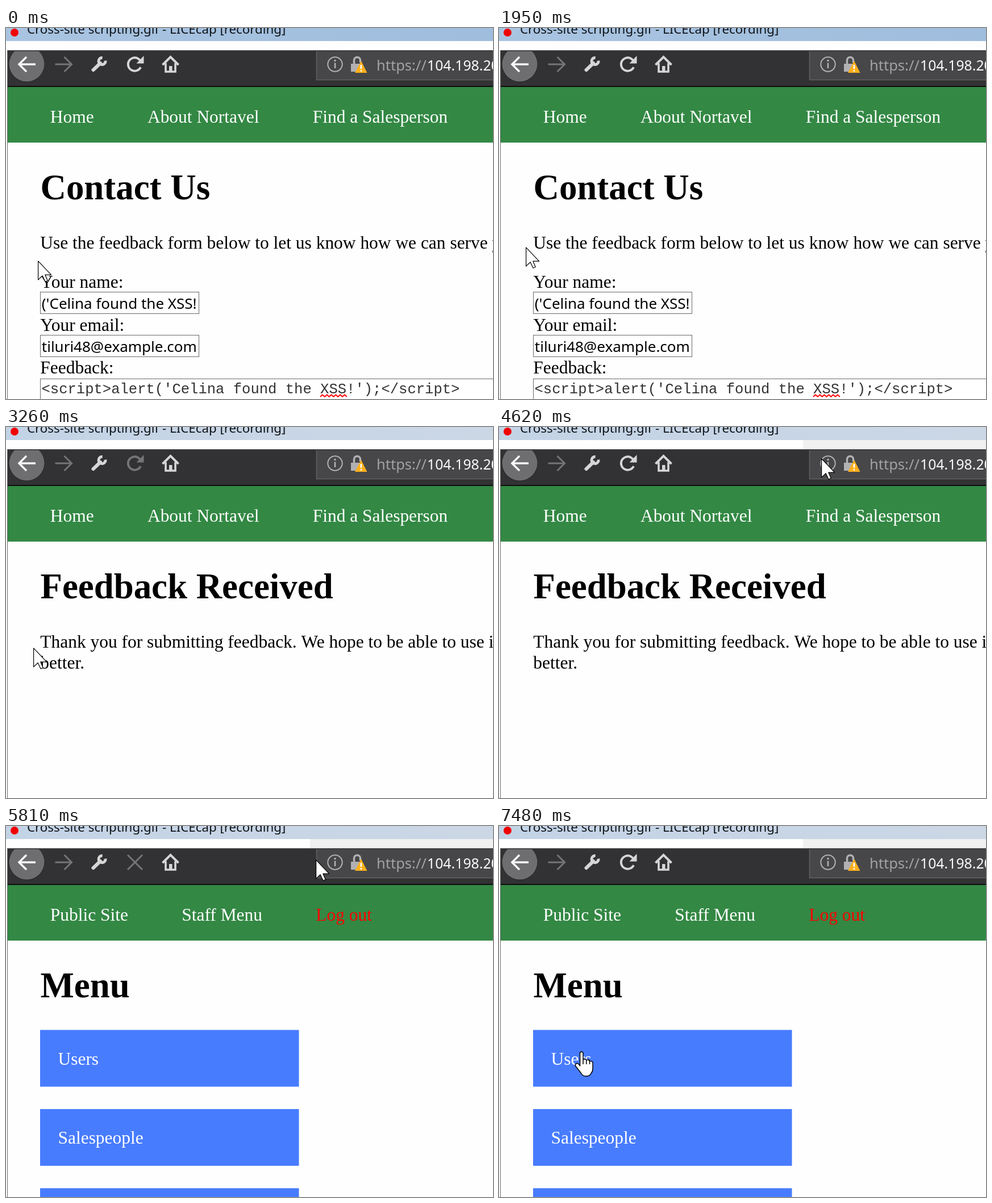
Animation, 857 px wide and 654 px high, one loop 8000 ms. Source, as an HTML page with a canvas:

```html
<!DOCTYPE html>
<html lang="en">
<head>
<meta charset="utf-8">
<title>Feedback form</title>
<style>
html, body { margin: 0; width: 100%; height: 100%; overflow: hidden; background: #fefefe; }
canvas { display: block; }
</style>
</head>
<body>
<canvas id="stage" width="857" height="654"></canvas>
<script>
const W = 857, H = 654, LOOP = 8000;
const ctx = document.getElementById('stage').getContext('2d');
const SERIF = '"Liberation Serif", serif';
const SANS = '"Noto Sans", sans-serif';
const MONO = '"Liberation Mono", monospace';
const EM = 31.44;
const LIGHT = '#d6d6d7', DIM = '#757577', GREY = '#b1b1b3', EDGE = '#6a6a6a';
const TAU = Math.PI * 2;

const TICK = 150, RELOAD_PAUSE = 600;
const loads = [
  { start: 2810, done: 3260, page: thanksPage },
  { start: 5660, done: 5960, page: menuPage }
];
const BLUR_AT = 2680, STRIP_AT = 4460;

// Pointer strokes, each going on from where the one before ended.
const HOME = { x: 56, y: 410 };
const strokes = [
  { first: 150, last: 1060, x: 47, y: 392 },
  { first: 1520, last: 1950, x: 47, y: 386 },
  { first: 2250, last: 2400, x: 47, y: 384 },
  { first: 2680, last: 3260, x: 48, y: 389 },
  { first: 3860, last: 4160, x: 768, y: -43 },
  { first: 4460, last: 4770, x: 532, y: 72 },
  { first: 4920, last: 5220, x: 545, y: 59 },
  { first: 5960, last: 7030, x: 145, y: 397 },
  { first: 7330, last: 7480, x: 145, y: 398 }
];

function ease(p) {
  return p < 0.5 ? 4 * p ** 3 : 1 - 4 * (1 - p) ** 3;
}

function pointerAt(t) {
  let from = HOME;
  for (const to of strokes) {
    if (t < to.first) break;
    const gaps = Math.round((to.last - to.first) / TICK);
    const gone = Math.min(1, (t - to.first) / (to.last - to.first));
    const step = Math.floor(gone * gaps + 0.07) + 1;
    const p = ease(step / (gaps + 1));
    from = { x: from.x + (to.x - from.x) * p, y: from.y + (to.y - from.y) * p };
  }
  return { x: Math.round(from.x), y: Math.round(from.y) };
}

function pageAt(t) {
  return loads.reduce((page, l) => t >= l.done - TICK ? l.page : page, contactPage);
}

function reloadAt(t) {
  for (const { start, done } of loads) {
    if (t >= start && t < done) return 'stop';
    if (t >= done && t < done + RELOAD_PAUSE) return 'off';
  }
  return 'on';
}

function rect(x, y, w, h, fill) {
  ctx.fillStyle = fill;
  ctx.fillRect(x, y, w, h);
}

function text(str, x, y, size, color = '#000', family = SERIF, weight = '') {
  ctx.font = `${weight} ${size}px ${family}`;
  ctx.fillStyle = color;
  ctx.fillText(str, x, y);
}

function trace(points, close) {
  ctx.beginPath();
  points.forEach(([x, y]) => ctx.lineTo(x, y));
  if (close) ctx.closePath();
}

function line(points, color, width) {
  trace(points);
  ctx.strokeStyle = color;
  ctx.lineWidth = width;
  ctx.stroke();
}

function poly(points, fill) {
  trace(points, true);
  ctx.fillStyle = fill;
  ctx.fill();
}

function arc(x, y, r, from, to, color, width) {
  ctx.beginPath();
  ctx.arc(x, y, r, from, to);
  ctx.strokeStyle = color;
  ctx.lineWidth = width;
  ctx.stroke();
}

function disc(x, y, r, fill) {
  ctx.beginPath();
  ctx.arc(x, y, r, 0, TAU);
  ctx.fillStyle = fill;
  ctx.fill();
}

function clipped(x, y, w, h, paint) {
  ctx.save();
  ctx.beginPath();
  ctx.rect(x, y, w, h);
  ctx.clip();
  paint();
  ctx.restore();
}

function titleBar(t) {
  const [left, right] = t < BLUR_AT ? ['#a9c4e1', '#9fbddd'] : ['#c3d3e6', '#cbd7e5'];
  const g = ctx.createLinearGradient(0, 0, W, 0);
  g.addColorStop(0, left);
  g.addColorStop(1, right);
  rect(0, 0, W, 23, g);
  if (t >= STRIP_AT) rect(535, 23, W, 16, '#f0f0f0');
  disc(15, 8, 7, '#f00000');
  text('Cross-site scripting.gif - LICEcap [recording]', 37, 10, 22.3, '#101418', SANS);
}

// Horizontal arrow centred on (x, 64); dir is -1 for left, 1 for right.
function navArrow(x, dir, color, width) {
  const tip = x + dir * 14;
  line([[x - dir * 15, 64], [tip, 64]], color, width);
  line([[tip - dir * 13, 51], [tip, 64], [tip - dir * 13, 77]], color, width);
}

function reloadIcon(state) {
  if (state === 'stop') {
    line([[214, 51], [240, 77]], DIM, 3);
    line([[240, 51], [214, 77]], DIM, 3);
    return;
  }
  const color = state === 'on' ? LIGHT : DIM;
  arc(226.5, 64, 11.7, 0.45, TAU - 0.6, color, 3.8);
  poly([[242.5, 49], [242.5, 62.5], [229.5, 62.5]], color);
}

function wrenchIcon() {
  ctx.lineCap = 'round';
  line([[153.5, 74], [166, 62]], LIGHT, 6);
  ctx.lineCap = 'butt';
  arc(169, 58.5, 6, -0.15, TAU * 0.75 + 0.1, LIGHT, 5);
}

function homeIcon() {
  line([[275.5, 65], [289.5, 51], [303.5, 65]], LIGHT, 4);
  line([[281, 62], [281, 77], [298, 77], [298, 62]], LIGHT, 3.6);
  rect(287, 67, 5.5, 10, LIGHT);
}

function addressBar() {
  rect(546, 41, W, 51, '#474749');
  line([[546.5, 41], [546.5, 91.5], [W, 91.5]], '#606062', 1.5);

  arc(579, 64, 12.7, 0, TAU, GREY, 2);
  disc(579, 57.5, 1.8, GREY);
  rect(577.7, 61.5, 2.6, 9.5, GREY);

  line([[612.5, 64], [612.5, 57]], GREY, 3.5);
  arc(618, 57, 5.5, Math.PI, TAU, GREY, 3.5);
  line([[623.5, 57], [623.5, 61]], GREY, 3.5);
  rect(607, 63, 19, 14, GREY);
  poly([[625, 58], [635.5, 79], [614, 79]], '#ffb01c');
  rect(623.6, 65, 2.6, 7, '#fff');
  rect(623.6, 74, 2.6, 2.6, '#fff');

  text('https://', 652, 75, 25.5, '#a2a2a4', SANS);
  text('104.198.20', 741, 75, 24.8, '#f9f9fa', SANS);
}

function toolbar(t) {
  rect(2, 39, W, 63, '#323234');
  clipped(3, 41, W, 61, () => {
    disc(36.5, 64, 31.5, '#1f1f21');
    disc(36.5, 63.5, 31, '#6e6e70');
    navArrow(37, -1, '#f9f9fa', 3.5);
    navArrow(101.5, 1, DIM, 3);
    wrenchIcon();
    reloadIcon(reloadAt(t));
    homeIcon();
    addressBar();
  });
  rect(2, 102, W, 2, '#0d0d0e');
}

function nav(labels, lastColor = '#fff') {
  rect(3, 104, W, 98, '#338844');
  let x = 77.8;
  labels.forEach((label, i) => {
    text(label, x, 167, EM, i === labels.length - 1 ? lastColor : '#fff');
    x += ctx.measureText(label).width + EM * 3;
  });
}

function publicNav() {
  nav(['Home', 'About Nortavel', 'Find a Salesperson']);
}

function heading(str) {
  text(str, 60.5, 302, EM * 2, '#000', SERIF, 'bold');
}

function body(str, y) {
  text(str, 60.3, y, EM);
}

function box(y, w, h) {
  rect(60, y, w, h, EDGE);
  rect(61, y + 1, w - 2, h - 2, '#fff');
}

function field(y, value) {
  box(y, 280, 39);
  clipped(62, y, 276, 39, () => text(value, 62.8, y + 29.5, 26, '#000', SANS));
}

function contactPage() {
  publicNav();
  heading('Contact Us');
  body('Use the feedback form below to let us know how we can serve you', 389);
  body('Your name:', 458);
  field(465, "('Celina found the XSS!");
  body('Your email:', 533.5);
  field(541, 'tiluri48@example.com');
  body('Feedback:', 609);
  box(618, W, H);
  text("<script>alert('Celina found the XSS!');<\/script>", 62.5, 643.5, 25.55, '#333', MONO);
  const wave = [];
  for (let x = 553; x <= 600; x += 3.9) wave.push([x, wave.length % 2 ? 646.5 : 650]);
  line(wave, '#f00', 2);
}

function thanksPage() {
  publicNav();
  heading('Feedback Received');
  body('Thank you for submitting feedback. We hope to be able to use it to', 389);
  body('better.', 426);
}

function menuPage() {
  nav(['Public Site', 'Staff Menu', 'Log out'], '#f00');
  heading('Menu');
  ['Users', 'Salespeople', ''].forEach((label, i) => {
    const y = 359.5 + i * 139.5;
    rect(60, y, 455.5, 100, '#487cff');
    text(label, 91.5, y + 61, EM, '#fff');
  });
}

// Fills and outlines a pointer shape with its corner at (x, y).
function shape(path, x, y, width) {
  ctx.save();
  ctx.translate(x, y);
  ctx.lineJoin = 'round';
  ctx.lineWidth = width;
  ctx.fillStyle = '#fff';
  ctx.strokeStyle = '#000';
  ctx.fill(path);
  ctx.stroke(path);
  ctx.restore();
}

const arrowPath = new Path2D('M0 0V33L7.5 25.8L12.5 36.3L16.6 34.4L12.2 24.2H23Z');
const handPath = new Path2D(
  'M9.5 26V4Q9.5 1 12.2 1T15 4V15Q20 12.5 20.8 16Q25.5 13.5 26.5 18Q32 16.5 32 21V31' +
  'Q32 36 29 39Q27 44 20 44Q14 44 11 38Q7 33 1.5 26Q.5 23 3.5 21.5Q7 21 9.5 26Z');
for (const x of [15, 20.8, 26.5]) {
  handPath.moveTo(x, 15);
  handPath.lineTo(x, 23);
}

function pointer(t) {
  const { x, y } = pointerAt(t);
  const overButton = pageAt(t) === menuPage && y > 359;
  if (overButton) shape(handPath, x - 12, y - 1, 1.5);
  else shape(arrowPath, x + 0.6, y + 0.9, 1.2);
}

function draw(t) {
  rect(0, 0, W, H, '#fefefe');
  titleBar(t);
  toolbar(t);
  pageAt(t)();
  rect(2, 39, W, 1, EDGE);
  rect(2, 39, 1, H, EDGE);
  pointer(t);
}

const start = performance.now();
function frame() {
  draw((performance.now() - start) % LOOP);
  requestAnimationFrame(frame);
}
frame();
</script>
</body>
</html>
```
